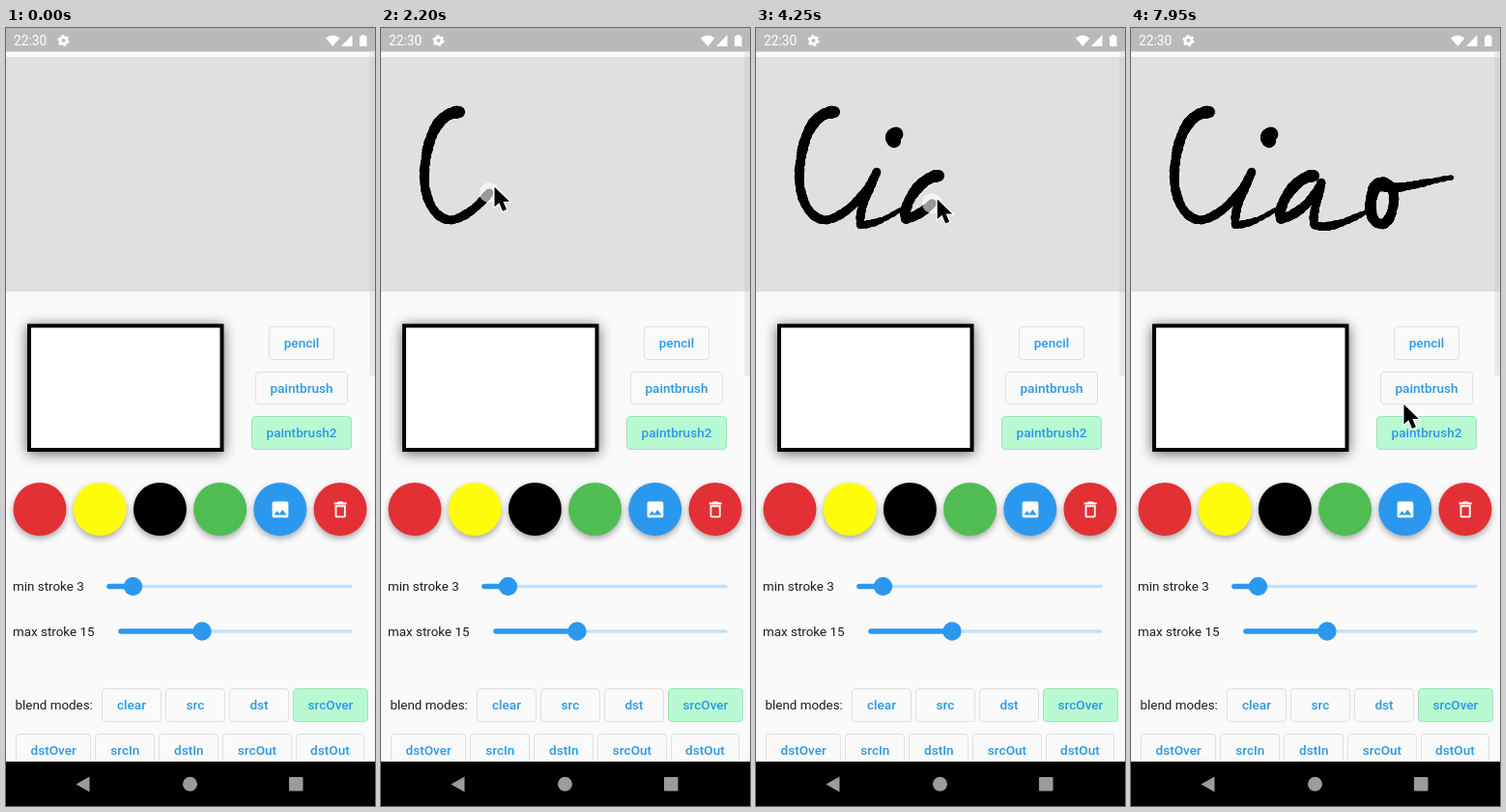
These frames come from a looping animation (382 by 806 pixels, 8000 ms). An HTML page with a canvas:

```html
<!DOCTYPE html>
<html lang="en">
<head>
<meta charset="utf-8">
<title>Paint screen</title>
<style>
  html, body { margin: 0; width: 100%; height: 100%; overflow: hidden; background: #fafafa; }
  svg, canvas, .group { position: absolute; left: 0; top: 0; }
  text { font: 13.4px Roboto, sans-serif; fill: #1c1c1c; }
  #page { position: absolute; width: 382px; height: 760px; overflow: hidden; }
  .group { display: flex; gap: 4px; }
  .column { flex-direction: column; align-items: center; gap: 12px; left: 206px; top: 309px; width: 200px; }
  .group span {
    box-sizing: border-box; min-width: 62px; height: 34.5px; padding: 0 14.5px;
    border: 1px solid #e0e0e0; border-radius: 4px; background: #fafafa;
    font: 500 13.6px/32.5px Roboto, sans-serif; color: #2b98e8; text-align: center;
  }
  .group .on { background: #b9fad2; border-color: #a5dfbb; }
  .round { filter: drop-shadow(0 3px 3px #0005); }
  .frame { filter: drop-shadow(0 2px 7px #0009); }
</style>
</head>
<body>
<svg width="382" height="806">
  <rect width="382" height="806" fill="#fafafa"/>
  <rect y="30" width="382" height="243" fill="#e0e0e0"/>
  <rect width="382" height="24.5" fill="#bababa"/>
  <rect x="376.5" y="25" width="5.5" height="335" fill="#bcbcbc" opacity=".3"/>

  <g fill="#fff">
    <text x="8" y="18" style="font-size:13.8px;fill:#fff">22:30</text>
    <circle cx="59.5" cy="13" r="3.4" fill="none" stroke="#fff" stroke-width="2.8"/>
    <circle cx="59.5" cy="13" r="5.2" fill="none" stroke="#fff" stroke-width="1.8" stroke-dasharray="2.7 2.745"/>
    <path d="M331 10.5Q338 4.5 345.5 10.5L338.2 19Z"/>
    <path d="M358.5 7V19H347Z"/>
    <path d="M366 8.5H368V7H371.5V8.5H373.5V19H366Z"/>
  </g>

  <rect class="frame" x="24" y="308.5" width="199.5" height="128.5" fill="#fff" stroke="#000" stroke-width="4"/>

  <g id="dots"></g>
  <g fill="#fff" fill-rule="evenodd">
    <path transform="translate(272.8 487.8) scale(.93)" d="M21 19V5c0-1.1-.9-2-2-2H5c-1.1 0-2 .9-2 2v14c0 1.1.9 2 2 2h14c1.1 0 2-.9 2-2zM8.5 13.5l2.5 3 3.5-4.5 4.5 6H5z"/>
    <path transform="translate(335 487.8) scale(.93)" d="M6 19c0 1.1.9 2 2 2h8c1.1 0 2-.9 2-2V7H6zM8 9h8v10H8zM15.5 4l-1-1h-5l-1 1H5v2h14V4z"/>
  </g>

  <text x="7" y="583">min stroke 3</text>
  <text x="7" y="630">max stroke 15</text>
  <g id="sliders" stroke-linecap="round"></g>
  <text x="9.5" y="705.5">blend modes:</text>

  <rect y="760" width="382" height="46"/>
  <g fill="#9b9b9b">
    <path d="M72.5 783.5L86.5 775.5V791.5Z"/>
    <circle cx="190.5" cy="783.3" r="7.5"/>
    <rect x="293" y="776" width="14.5" height="14.5" rx="1"/>
  </g>
</svg>
<div id="page">
  <div class="group column"><span>pencil</span><span>paintbrush</span><span class="on">paintbrush2</span></div>
  <div class="group" style="left:99px;top:684px">
    <span>clear</span><span>src</span><span>dst</span><span class="on">srcOver</span>
  </div>
  <div class="group" style="left:10px;top:730.5px">
    <span>dstOver</span><span>srcIn</span><span>dstIn</span><span>srcOut</span><span>dstOut</span>
  </div>
</div>
<canvas id="stage" width="382" height="806"></canvas>

<script>
const fill = (id, items, draw) =>
  document.getElementById(id).innerHTML = items.map(draw).join('');

fill('dots', ['#e33035', '#fffd0a', '#000', '#50bd52', '#2b98f0', '#e33035'], (color, i) =>
  `<circle class="round" cx="${35 + i * 62.2}" cy="498.5" r="27.5" fill="${color}"/>`);

fill('sliders', [[106, 131.5, 578.5], [118, 203, 625]], ([left, thumb, y]) =>
  `<path d="M${left} ${y}H357" stroke="#c3e1fa" stroke-width="3.6"/>
   <path d="M${left + 1} ${y}H${thumb}" stroke="#2b98f0" stroke-width="5.5"/>
   <circle cx="${thumb}" cy="${y}" r="9.7" fill="#2b98f0"/>`);

const LOOP = 8000, LAG = 40, GAP = 0.7;

// The pen follows each path at an even speed; paths without a body radius are hovers.
const strokes = [
  { start: 50, end: 200, path: 'M270 146h.1' },
  { start: 1050, end: 1240, path: 'M81 87h.1' },
  { start: 1250, end: 2780, body: 4.1, tip: 1.8,
    path: 'M81 87C60 87 49 112 46 139C41 168 52 199 73 199C92 196 116 171 125 149C119 166 106 186 108 204C121 204 137 197 151 187' },
  { start: 2900, end: 3080, body: 5, tip: 5.5, path: 'M145 110Q139 113 143 117' },
  { start: 3700, end: 4960, body: 4.1, tip: 1.8,
    path: 'M189 153C170 154 151 184 155 198C172 194 190 178 197 160C194 176 187 194 190 204C205 211 235 195 252 186' },
  { start: 5390, end: 6245, body: 4.1, tip: 2,
    path: 'M253 164C246 178 245 203 260 203C271 202 277 170 267 162C262 157 253 160 254 163C270 171 308 158 332 155' },
  { start: 7080, end: 7920, path: 'M362 181C362 230 320 330 282 389' }
];

// Ink starts heavy, thins along the way and tapers at the end, with a rough edge.
for (const s of strokes) {
  const path = document.createElementNS('http://www.w3.org/2000/svg', 'path');
  path.setAttribute('d', s.path);
  const size = path.getTotalLength(), count = Math.max(1, Math.round(size / GAP));
  s.dots = Array.from({ length: count + 1 }, (_, i) => {
    const at = i / count * size, { x, y } = path.getPointAtLength(at);
    const taper = Math.min(1, (size - at) / 50);
    const r = s.tip + (s.body - s.tip) * taper + 2 * Math.exp(-at / 70) * (s.body ? 1 : 0);
    return { x, y, r: r + 0.45 * Math.sin(at * 0.55) * Math.sin(at * 0.31) };
  });
}

const clamp = v => Math.min(1, Math.max(0, v));
const reach = (s, t) => Math.round(clamp((t - s.start) / (s.end - s.start)) * (s.dots.length - 1));
const penAt = (s, t) => s.dots[reach(s, t)];

function cursorAt(t) {
  const next = strokes.findIndex(s => t < s.end);
  if (next < 0) return strokes.at(-1).dots.at(-1);
  const s = strokes[next];
  if (t >= s.start) return penAt(s, t);
  const prev = strokes[next - 1], from = prev.dots.at(-1), to = s.dots[0];
  const f = (t - prev.end) / (s.start - prev.end), ease = f * f * (3 - 2 * f);
  return { x: from.x + (to.x - from.x) * ease, y: from.y + (to.y - from.y) * ease };
}

const g = document.getElementById('stage').getContext('2d');
const arrow = new Path2D('M0 0V20.5L4.8 16.3L8.5 25L12.5 23.3L8.9 15H15.5Z');

function disc({ x, y }, r) {
  g.beginPath();
  g.arc(x, y, r, 0, 7);
  g.fill();
}

function drawInk(s, t) {
  g.fillStyle = '#000';
  for (const dot of s.dots.slice(0, reach(s, t) + 1)) disc(dot, dot.r);
}

function drawTouch(s, t) {
  const alpha = clamp((t - s.start) / 80) * clamp(1 - (t - s.end) / 120);
  g.fillStyle = `rgba(255,255,255,${0.6 * alpha})`;
  disc(penAt(s, t - LAG), 10.5);
}

function drawCursor({ x, y }) {
  g.save();
  g.translate(x + 0.5, y + 1);
  g.lineWidth = 2.5;
  g.strokeStyle = '#fff';
  g.stroke(arrow);
  g.fillStyle = '#000';
  g.fill(arrow);
  g.restore();
}

function frame(now) {
  const t = now % LOOP;
  g.clearRect(0, 0, 382, 806);
  const inked = strokes.filter(s => s.body && t >= s.start + LAG);
  inked.forEach(s => drawInk(s, t - LAG));
  inked.forEach(s => drawTouch(s, t));
  if (t >= 50) drawCursor(cursorAt(t));
  requestAnimationFrame(frame);
}
requestAnimationFrame(frame);
</script>
</body>
</html>
```
